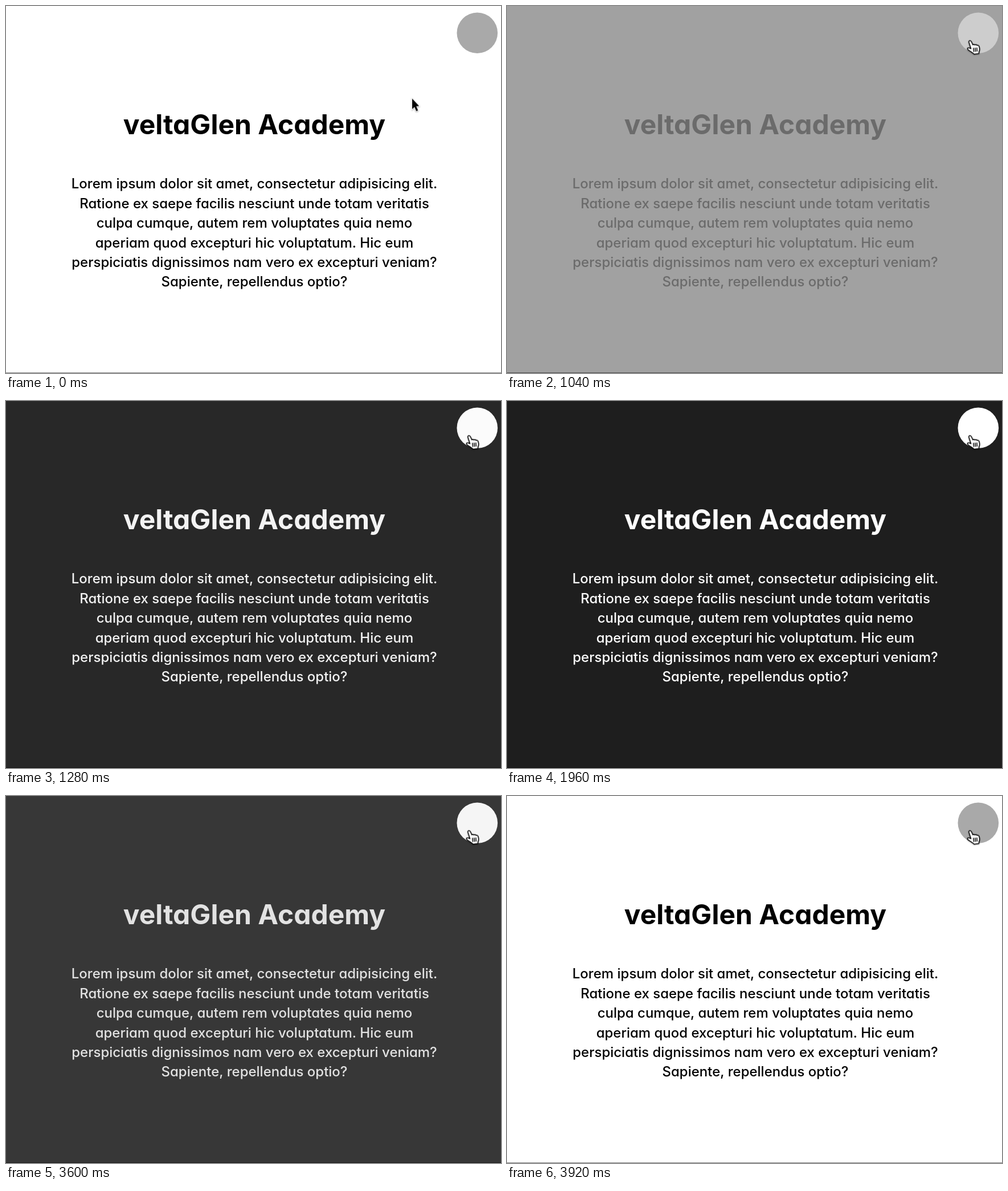
These frames come from a looping animation (869x644 px, 4.15 s). An HTML page:

```html
<!DOCTYPE html>
<html lang="en">
<head>
<meta charset="utf-8">
<title>Theme toggle</title>
<style>
  @property --bg { syntax: "<color>"; inherits: true; initial-value: #fff; }
  @property --ink { syntax: "<color>"; inherits: true; initial-value: #000; }
  @property --dot { syntax: "<color>"; inherits: true; initial-value: #a9a9a9; }

  html, body { margin: 0; width: 100%; height: 100%; overflow: hidden; background: #fff; }

  svg {
    display: block;
    width: 869px;
    height: 644px;
    background: var(--bg);
    animation: theme 4150ms infinite;
  }

  text {
    font: 500 24px Inter, "Open Sans", sans-serif;
    font-feature-settings: "cv11";
    font-optical-sizing: none;
    text-anchor: middle;
    fill: var(--ink);
  }
  .title { font-size: 48px; font-weight: 700; }
  .toggle { fill: var(--dot); }

  .cursor {
    filter: drop-shadow(0 1.5px 1.2px rgba(0, 0, 0, .35));
    animation: move 4150ms infinite;
  }
  .arrow { animation: arrow 4150ms step-end infinite; }
  .hand { animation: hand 4150ms step-end infinite; }

  @keyframes theme {
    0%, 94.7%, 100% { --bg: #fff; --ink: #000; --dot: #a9a9a9; }
    22.02% { --bg: #fff; --ink: #000; --dot: #a9a9a9; animation-timing-function: ease; }
    34.07% { --bg: #1e1e1e; --ink: #fff; --dot: #fff; }
    85.78% { --bg: #1e1e1e; --ink: #fff; --dot: #fff; animation-timing-function: ease; }
  }
  @keyframes move {
    0% { transform: translate(713px, 162.5px); animation-timing-function: cubic-bezier(.35, .1, .3, 1); }
    12.53%, 13.49% { transform: translate(809px, 66.5px); animation-timing-function: ease-in-out; }
    18.8%, 100% { transform: translate(813px, 60.7px); }
  }
  @keyframes arrow {
    0% { opacity: 1; }
    7.7%, 100% { opacity: 0; }
  }
  @keyframes hand {
    0% { opacity: 0; }
    7.7%, 100% { opacity: 1; }
  }
</style>
</head>
<body>
<svg viewBox="0 0 869 644">
  <text class="title" x="436" y="225">veltaGlen Academy</text>
  <text x="436" y="320.3">Lorem ipsum dolor sit amet, consectetur adipisicing elit.</text>
  <text x="436" y="354.7">Ratione ex saepe facilis nesciunt unde totam veritatis</text>
  <text x="436" y="389.1">culpa cumque, autem rem voluptates quia nemo</text>
  <text x="436" y="423.5">aperiam quod excepturi hic voluptatum. Hic eum</text>
  <text x="436" y="457.9">perspiciatis dignissimos nam vero ex excepturi veniam?</text>
  <text x="436" y="492.3">Sapiente, repellendus optio?</text>

  <circle class="toggle" cx="827.3" cy="47.3" r="35.8"/>
  <rect y="643" width="869" height="1" fill-opacity=".5"/>

  <g class="cursor">
    <path class="arrow" d="M0 0V18.5L4.1 14.8 7.2 22 10.3 20.7 7.2 13.6 12.2 13Z"
      stroke="#fff" stroke-width="2" paint-order="stroke"/>
    <g class="hand" stroke="#000" stroke-width="1.4" stroke-linejoin="round" stroke-linecap="round">
      <g transform="translate(-6.2 -1) scale(1.1)">
        <path fill="#fff" d="M4.2 5.2C3.2 2.6 3.6 1.2 5 .9 6.4.6 7.3 1.6 8 3.2L10 7.6C10.6 6.7 12.6 6.6 13.3 7.9 14.3 7 16 7.1 16.6 8.5 18.2 7.8 19.5 8.6 20 10.2 20.8 13 21.3 16 19.8 18.8L19.6 21.6 12 22.6C10.5 20.6 6 18.3 2.5 15.6.8 14.2 1.3 12.2 3 12.3 4.5 12.3 5.8 13.2 7 13.8Z"/>
        <path fill="none" d="M11 13L11.5 18.4M13.7 12.8L14.2 18.2M16.4 12.6L16.8 17.8"/>
      </g>
    </g>
  </g>
</svg>
</body>
</html>
```
